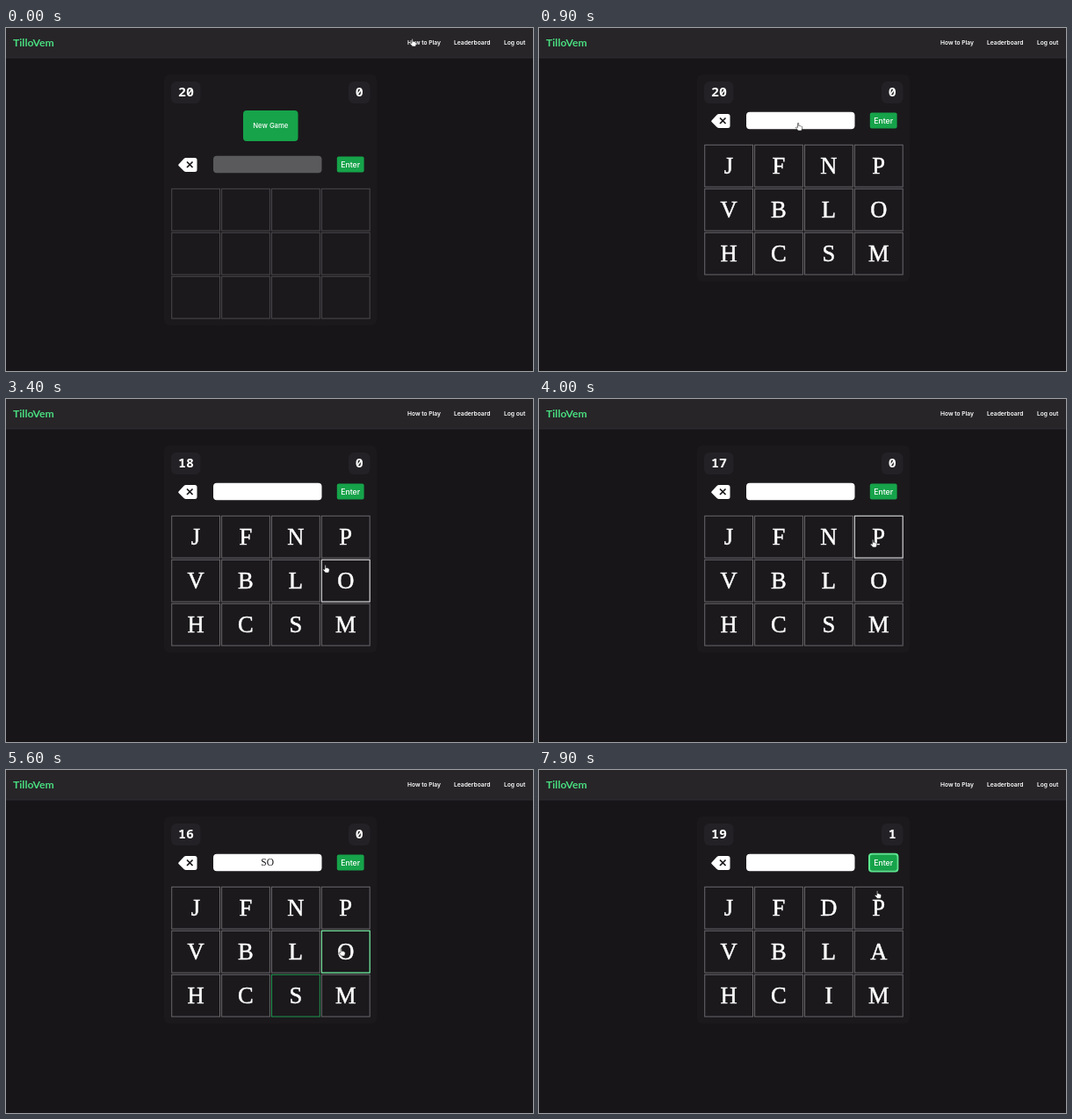
Recreate the animation shown at these times as an HTML page. Size 600 by 391 pixels, loop 8000 ms.

```html
<!DOCTYPE html>
<html lang="en">
<head>
<meta charset="utf-8">
<title>Word game</title>
<style>
html, body { margin: 0; height: 100%; overflow: hidden; background: #171518; }
svg { display: block; width: 600px; height: 391px; font-family: Inter, sans-serif; fill: #fff; }
.nav { font-size: 6.7px; font-weight: 600; }
.logo { font: 700 12.2px Lato, sans-serif; fill: #4ade80; }
.count { font: 600 15px "Noto Sans Mono", monospace; text-anchor: middle; }
.serif { font-family: "Liberation Serif", serif; text-anchor: middle; }
.letter { font-size: 26.5px; stroke: #fff; stroke-width: .5; }
.box { fill: #232125; }
.tile { fill: none; stroke-width: 1; }
</style>
</head>
<body>
<svg viewBox="0 0 600 391">
  <rect width="600" height="34" fill="#272528"/>
  <rect y="33.5" width="600" height="1" fill="#2e2c30"/>
  <text class="logo" x="8" y="21">TilloVem</text>
  <g class="nav">
    <text x="457" y="19">How to Play</text>
    <text x="510" y="19">Leaderboard</text>
    <text x="567" y="19">Log out</text>
  </g>
  <rect id="panel" x="180" y="53" width="242" rx="6" fill="#1b191c"/>
  <rect class="box" x="188" y="61" width="33.5" height="25" rx="6"/>
  <rect class="box" x="390" y="61" width="24.5" height="25" rx="6"/>
  <text class="count" id="timer" x="205" y="78.3"></text>
  <text class="count" id="score" x="402.3" y="78.3"></text>
  <g id="newGame">
    <rect id="newButton" x="270" y="94" width="62.5" height="35" rx="4"/>
    <text x="301.3" y="114.3" font-size="7.7" font-weight="500" text-anchor="middle">New Game</text>
  </g>
  <g id="board">
    <path d="M196.5 105.5L202.500 99Q203.500 98 205 98H215Q217.500 98 217.500 100.500V111.500Q217.500 114 215 114H205Q203.500 114 202.500 113L196.500 107Q195.800 106.200 196.500 105.500Z"/>
    <path d="M206 102.500l6.500 6.500m0-6.500l-6.500 6.500" stroke="#171518" stroke-width="1.7"/>
    <rect id="field" x="236" y="95.8" width="123.5" height="19.4" rx="4"/>
    <text id="word" class="serif" x="297.7" y="109.4" font-size="11.5"></text>
    <rect id="enter" x="376.8" y="96.6" width="30.8" height="18" rx="2"/>
    <rect id="ring" x="376" y="95.8" width="32.4" height="19.6" rx="3" fill="none" stroke="#5ce78f" stroke-width="2"/>
    <text x="392.2" y="108.5" font-size="8.7" font-weight="500" text-anchor="middle">Enter</text>
    <g id="tiles"></g>
  </g>
  <g id="cursor" stroke="#222" stroke-width=".6" stroke-linejoin="round">
    <path id="hand" d="M2.500 5.500V1Q2.500.2 3.100.2T3.700 1V3.500Q5 3 5.500 3.800Q6.500 3.500 6.900 4.400Q7.600 4.300 7.700 5.200Q7.800 7 6.800 9H3Q2.300 7.500.6 6.200Q0 5.300 1 5Q1.700 4.900 2.500 5.500Z"/>
    <path id="arrow" d="M2 0V8L3.900 6.300L5.200 9L6.300 8.500L5.100 5.900H7.600Z" style="fill:#111;stroke:#fff"/>
  </g>
</svg>
<script>
const LOOP = 8000, START = 850, SUBMIT = 6350;
const LAG = 80, FADE = 150, FADE_STEPS = 10;
const GREEN = '#16a34a', DARK_GREEN = '#15803d';
const picks = { S: 5130, O: 5520 };
const fresh = { N: 'D', O: 'A', S: 'I' };

// Pointer trips: leave, arrive, x, y
const home = [459.5, 12];
const trips = [
  [100, 850, 292, 108],
  [2350, 3100, 366, 203],
  [3150, 3400, 360.5, 189],
  [3450, 3850, 377, 160],
  [4640, 4850, 332, 255],
  [5200, 5450, 378.5, 203],
  [5720, 6150, 386.5, 104.5],
  [7620, 7900, 382, 137.5]
];

const el = id => document.getElementById(id);
const set = (id, key, value) => el(id).setAttribute(key, value);
const show = (id, on) => set(id, 'visibility', on ? 'visible' : 'hidden');
const ease = u => u * u * (3 - 2 * u);

const make = (tag, attrs) => {
  const node = document.createElementNS('http://www.w3.org/2000/svg', tag);
  for (const key in attrs) node.setAttribute(key, attrs[key]);
  return el('tiles').appendChild(node);
};

const tiles = [...'JFNPVBLOHCSM'].map((letter, i) => {
  const x = 188.7 + (i % 4) * 56.9, y = 133.3 + Math.floor(i / 4) * 50;
  const area = { x, y, width: 54.8, height: 47.8 };
  return {
    letter, area,
    border: make('rect', { class: 'tile', ...area }),
    glow: make('rect', { class: 'tile', ...area }),
    text: make('text', { class: 'serif letter', x: x + 27.3, y: y + 32.2 })
  };
});

function pointer(t) {
  return trips.reduce(([x, y], [leave, arrive, toX, toY]) => {
    const k = ease(Math.max(0, Math.min(1, (t - leave) / (arrive - leave))));
    return [x + (toX - x) * k, y + (toY - y) * k];
  }, home);
}

function over(t, { x, y, width, height }) {
  const [left, top] = pointer(t - LAG), dx = left + 3 - x, dy = top - y;
  return dx > 0 && dx < width && dy > 0 && dy < height;
}

// Share of the last FADE ms the pointer spent over an area
function hoverLevel(t, area) {
  let hits = 0;
  for (let i = 0; i < FADE_STEPS; i++) hits += over(t - FADE * i / FADE_STEPS, area);
  return hits / FADE_STEPS;
}

const buttonFill = (id, t) => {
  const { x, y, width, height } = el(id).getBBox();
  set(id, 'fill', over(t, { x, y, width, height }) ? DARK_GREEN : GREEN);
};

function draw(t) {
  const started = t >= START, submitted = t >= SUBMIT;
  const elapsed = t - (submitted ? SUBMIT : START) - 50;
  el('timer').textContent = 20 - Math.max(0, Math.floor(elapsed / 1000));
  el('score').textContent = submitted ? 1 : 0;

  show('newGame', !started);
  show('ring', submitted);
  buttonFill('newButton', t);
  buttonFill('enter', t);
  set('panel', 'height', started ? 236 : 286);
  set('board', 'transform', `translate(0 ${started ? 0 : 50})`);
  set('field', 'fill', started ? '#fff' : '#5a595b');

  const picked = letter => !submitted && t >= picks[letter];
  el('word').textContent = Object.keys(picks).filter(picked).join('');
  set('word', 'fill', '#171518');

  for (const { letter, area, border, glow, text } of tiles) {
    text.textContent = started ? (submitted && fresh[letter]) || letter : '';
    border.setAttribute('stroke', picked(letter) ? '#219750' : started ? '#69676b' : '#4a484c');
    glow.setAttribute('stroke', picked(letter) ? '#86efac' : '#d8d7da');
    glow.setAttribute('opacity', started ? hoverLevel(t, area) : 0);
  }

  const [x, y] = pointer(t), onLink = y < 24 || y > 92;
  set('cursor', 'transform', `translate(${x} ${y})`);
  show('hand', onLink);
  show('arrow', !onLink);
}

function tick() {
  draw(performance.now() % LOOP);
  requestAnimationFrame(tick);
}
tick();
</script>
</body>
</html>
```
